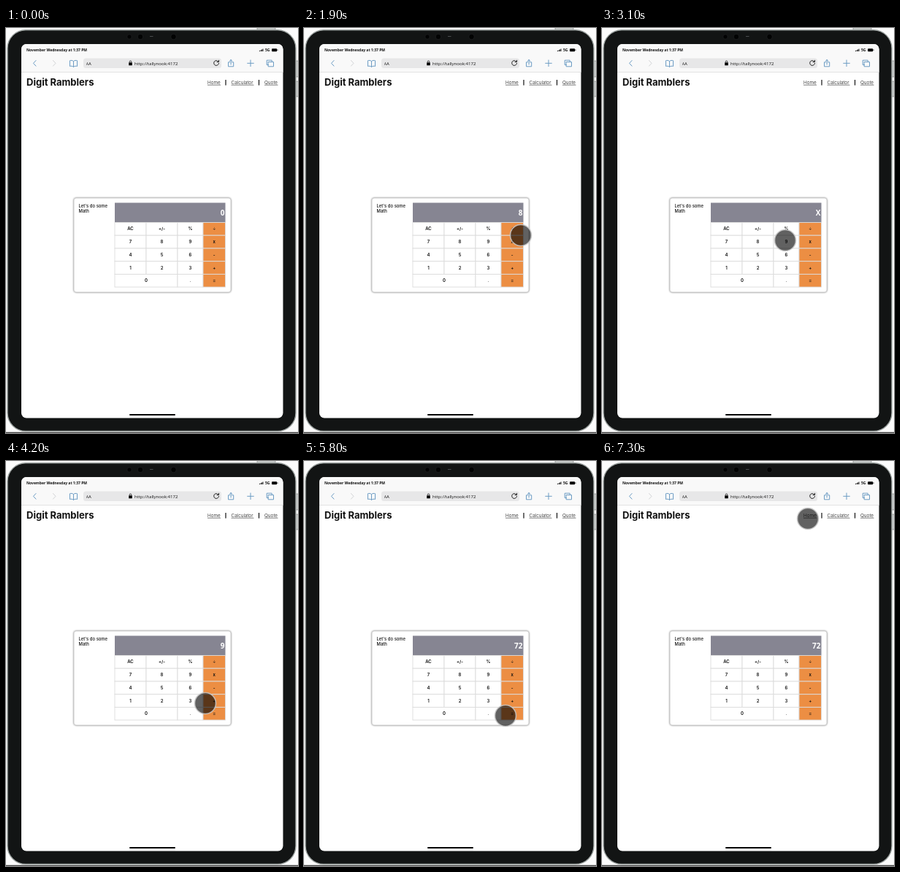
Write an HTML page that moves like this. It is 400x555 px and loops after 8000 ms.

```html
<!DOCTYPE html>
<html lang="en">
<head>
<meta charset="utf-8">
<title>Calculator</title>
<style>
  html, body { margin: 0; width: 100%; height: 100%; overflow: hidden; background: #fbfbfb; }
  svg { display: block; width: 400px; height: 555px; }
  text { font-family: Inter, sans-serif; fill: #111; }
  .bar text { font: 700 5px "Open Sans", sans-serif; }
  .bar .url { font-weight: 400; font-size: 6.1px; }
  .bar .aa { font-weight: 400; font-size: 6px; }
  .line { fill: none; stroke: #6c9cc4; stroke-width: 1; stroke-linecap: round; stroke-linejoin: round; }
  .title { font-weight: 700; font-size: 13px; }
  .nav text { font-size: 6.4px; font-weight: 300; }
  .note { font-size: 5.9px; font-weight: 500; }
  .keys text { font-size: 6px; font-weight: 600; text-anchor: middle; }
  .keys rect { stroke: #dcdcdc; stroke-width: .9; }
  #result { font: 700 10px "Open Sans", sans-serif; fill: #fff; text-anchor: end; }
  .card { fill: #fff; stroke: #c4c4c4; stroke-width: .8; filter: drop-shadow(0 .6px 1.2px #0007); }
</style>
</head>
<body>
<svg viewBox="0 0 400 555">
  <!-- tablet -->
  <path d="M0 554.3H400" stroke="#444" stroke-width="1.2"/>
  <g fill="#c9cccb" stroke="#868b89" stroke-width=".7">
    <rect x="344" y="-1" width="25" height="4"/>
    <rect x="396" y="45" width="5" height="22"/>
    <rect x="396" y="73" width="5" height="21"/>
  </g>
  <rect x="2" y="2.8" width="395" height="549.7" rx="25" fill="#121414" stroke="#9da3a1" stroke-width="1.4"/>
  <g fill="#020303" stroke="#252829" stroke-width=".6">
    <circle cx="169" cy="12" r="3.2"/>
    <circle cx="184" cy="12" r="3.8"/>
    <circle cx="229.500" cy="12" r="3.8"/>
  </g>
  <path d="M197 11.500H201.500" stroke="#4a4d4e"/>
  <rect x="21" y="22" width="358.500" height="512.500" rx="7" fill="#fff"/>

  <!-- browser bar -->
  <g class="bar">
    <path d="M21 60.500V29a7 7 0 0 1 7-7H372.500a7 7 0 0 1 7 7V60.500Z" fill="#f9f9f9"/>
    <path d="M21 60.500H379.500" stroke="#dcdcdc" stroke-width=".8"/>
    <text x="28" y="32">November Wednesday at 1:37 PM</text>
    <path d="M347.500 32v-1M349 32v-1.800M350.500 32v-2.600M352 32v-3.400" stroke="#111"/>
    <text x="355" y="32">5G</text>
    <rect x="364" y="28.300" width="7.200" height="3.900" rx="1"/>
    <path d="M372 29.500v1.500" stroke="#111" stroke-width=".7"/>
    <rect x="106" y="41.500" width="189" height="13.500" rx="3.500" fill="#e7e7e8"/>
    <text class="aa" x="113" y="50.800" >A</text>
    <text x="110" y="50.800" style="font-size:4.500px;font-weight:400">A</text>
    <rect x="168.200" y="47.300" width="4.600" height="4" rx=".6"/>
    <path d="M169.200 47.500v-1.200a1.300 1.300 0 0 1 2.600 0v1.200" fill="none" stroke="#111" stroke-width=".8"/>
    <text class="url" x="176" y="50.600">http://tallynook:4172</text>
    <g class="line">
      <path d="M41 44.500l-3.500 3.800 3.500 3.800"/>
      <path d="M64.500 44.500l3.500 3.800-3.500 3.800" stroke="#d2d4d6"/>
      <path d="M92.500 45.500c-1.500-1.300-3.500-1.300-5-.8v7.800c1.500-.5 3.500-.5 5 .8c1.500-1.300 3.500-1.300 5-.8v-7.800c-1.500-.5-3.500-.5-5 .8v7.800"/>
      <path d="M291 46.200a3.400 3.400 0 1 0 .5 2.200M291.500 44.300v2.300h-2.300" stroke="#222"/>
      <path d="M306.500 46.800h-2v6h7.200v-6h-2M308.100 50v-6.500m-1.800 1.800l1.800-1.800 1.800 1.800"/>
      <path d="M335 44v8.600M330.700 48.300h8.600"/>
      <path d="M359.500 46.500h7v6.300h-7zM359.500 50.500h-2.300v-6.300h7v2.300"/>
    </g>
  </g>

  <!-- page -->
  <text class="title" x="28" y="79">Digit Ramblers</text>
  <g class="nav">
    <text x="276" y="77">Home</text>
    <text x="308.500" y="77">Calculator</text>
    <text x="354" y="77">Quote</text>
    <path d="M276 78.200h18M308.500 78.200h31M354 78.200h18.500" stroke="#333" stroke-width=".6"/>
    <path d="M301 71v7.500M346.500 71v7.500" stroke="#111" stroke-width="1.200"/>
  </g>
  <rect class="card" x="93" y="233" width="215" height="129" rx="3"/>
  <text class="note" x="99.500" y="245.500">Let's do some</text>
  <text class="note" x="99.500" y="253">Math</text>
  <rect x="149" y="239.500" width="151.500" height="27" fill="#868592"/>
  <text id="result" x="299.500" y="257.300">0</text>
  <g class="keys" id="keys"></g>
  <path d="M170 530h61" stroke="#000" stroke-width="2" stroke-linecap="round"/>

  <circle id="touch" r="14.500" fill="#000" fill-opacity=".62" stroke="#c8c8c8" stroke-opacity=".85" stroke-width="1.600"/>
</svg>
<script>
const $ = id => document.getElementById(id);
const cols = [149, 192, 235, 270, 300.5];
const rows = [266.5, 284.2, 302, 319.7, 337.4, 355];
const labels = ["AC +/- % ÷", "7 8 9 x", "4 5 6 -", "1 2 3 +", "0 . ="];

const key = (label, x0, x1, y0, y1, orange) =>
  `<rect x="${x0}" y="${y0}" width="${x1 - x0}" height="${y1 - y0}" fill="${orange ? "#ec8e43" : "#fff"}"/>
   <text x="${(x0 + x1) / 2}" y="${(y0 + y1) / 2 + 2.1}">${label}</text>`;

$("keys").innerHTML = labels.map((line, r) => {
  const names = line.split(" ");
  const edges = names.length < 4 ? cols.filter((_, i) => i !== 1) : cols;
  return names.map((n, c) =>
    key(n, edges[c], edges[c + 1], rows[r], rows[r + 1], c === names.length - 1)).join("");
}).join("");

// [time, x, y] of the touch point
const path = [
  [400, 222, 314], [500, 213, 300], [1500, 213, 300], [1900, 297, 284],
  [2200, 297, 284], [2400, 288, 293], [2800, 288, 293], [3100, 251, 291],
  [4000, 251, 291], [4200, 273, 332], [4600, 276, 348], [5700, 276, 350],
  [5800, 276, 349], [6200, 287, 240], [6300, 287, 240], [6900, 282, 79], [8000, 282, 79]
];
// [time, display]
const results = [[0, "0"], [1100, "8"], [2300, "X"], [3600, "9"], [5100, "72"]];

function place(t) {
  const i = path.findIndex(p => p[0] > t);
  const [t0, x0, y0] = path[i - 1], [t1, x1, y1] = path[i];
  const k = (t - t0) / (t1 - t0);
  return [x0 + (x1 - x0) * k, y0 + (y1 - y0) * k];
}

function draw(now) {
  const t = Math.floor(now % 8000 / 100) * 100;
  const shown = t >= path[0][0];
  $("touch").style.display = shown ? "" : "none";
  if (shown) $("touch").setAttribute("transform", `translate(${place(t)})`);
  $("result").textContent = results.filter(r => r[0] <= t).pop()[1];
}

const start = performance.now();
function tick() {
  draw(performance.now() - start);
  requestAnimationFrame(tick);
}
tick();
</script>
</body>
</html>
```
